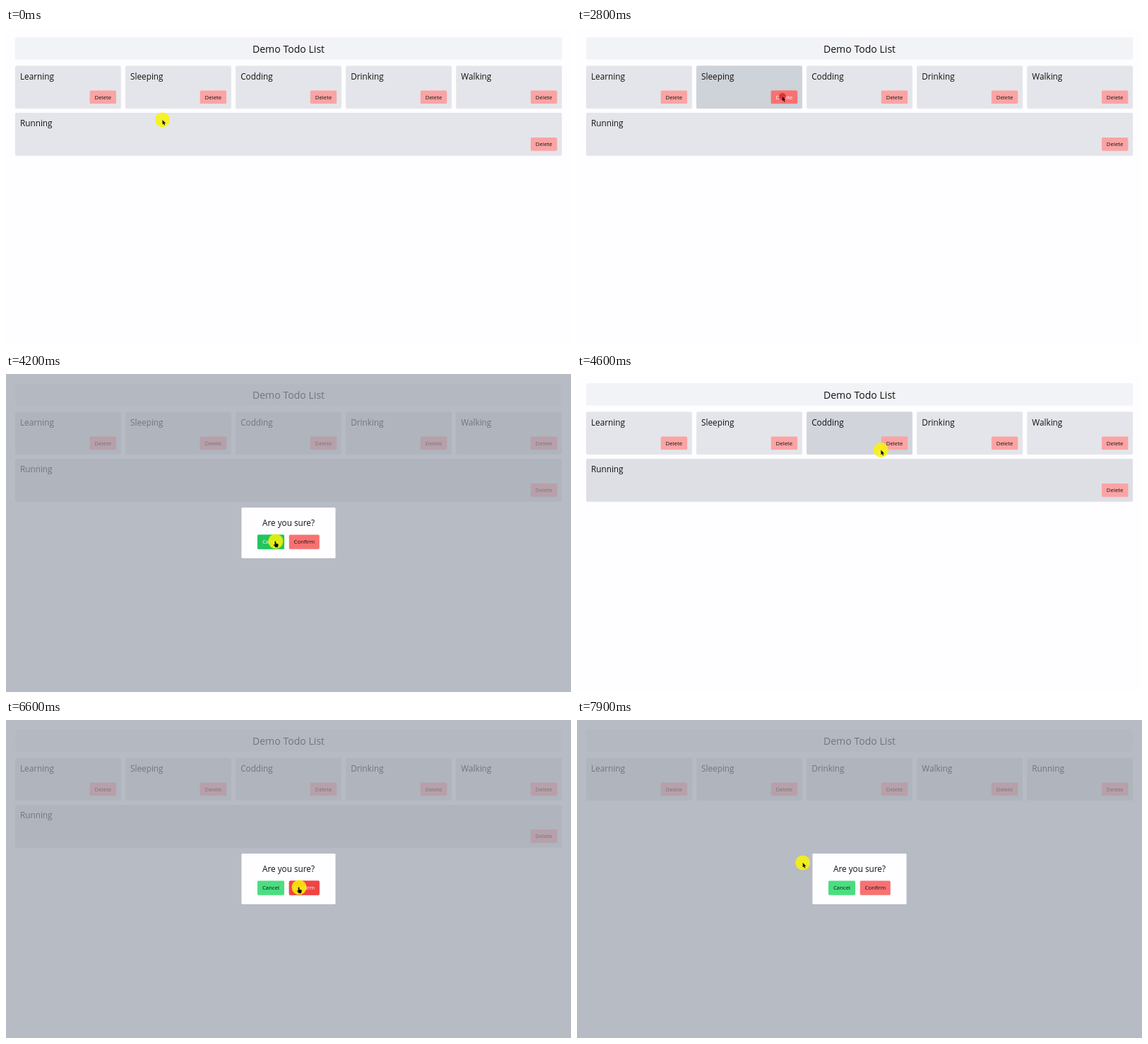
Recreate the animation shown at these times as an HTML page with a canvas. Size 800 px wide and 450 px high, loop 8 s.

```html
<!DOCTYPE html>
<html lang="en">
<head>
<meta charset="utf-8">
<title>Demo Todo List</title>
<style>
html, body { margin: 0; width: 100%; height: 100%; overflow: hidden; background: #fefdff; }
canvas { display: block; width: 800px; height: 450px; }
</style>
</head>
<body>
<canvas id="stage"></canvas>
<script>
const LOOP = 8000, FADE = 150, PRESS = 150;
const FONT = '"Open Sans", "Noto Sans", sans-serif';
const PAPER = '#fefdff', INK = '#111';
const RED = '#f87171', PINK = '#fca3a4';
const canvas = document.getElementById('stage');
const ctx = canvas.getContext('2d');
const ratio = window.devicePixelRatio || 1;
canvas.width = 800 * ratio;
canvas.height = 450 * ratio;

// Layout: five cards per row, a lone card fills its row
const MARGIN = 13, WIDTH = 774, GAP = 6.4, COLS = 5;
const box = (x, y, w, h) => ({ x, y, w, h });
const names = ['Learning', 'Sleeping', 'Codding', 'Drinking', 'Walking', 'Running'];

function layout(list) {
  return list.map((name, i) => {
    const row = Math.floor(i / COLS);
    const n = Math.min(COLS, list.length - row * COLS);
    const w = (WIDTH - GAP * (n - 1)) / n;
    return { name, ...box(MARGIN + (i % COLS) * (w + GAP), 53.4 + row * 66.7, w, 60.3) };
  });
}
const deleteBox = c => box(c.x + c.w - 44, c.y + 35, 37.3, 18.6);

const before = layout(names);
const after = layout(names.filter(name => name !== 'Codding'));
const dialog = box(333.4, 189.1, 133.2, 71.7);
const cancel = box(356, 227.4, 38, 20.3);
const confirmBox = box(400.8, 227.4, 43, 20.3);
const sleepDelete = deleteBox(before[1]), codeDelete = deleteBox(before[2]);

// Pointer stops; a press ends its stay and opens or closes the dialog
const wander = (at, x, y) => ({ at, end: at, x, y });
const press = (at, end, b, u) => ({ at, end, x: b.x + b.w * u, y: b.y + b.h * 0.46, click: true });
const stops = [
  wander(0, 221.5, 130),
  wander(450, 232, 247),
  wander(1250, 222, 92),
  wander(1570, 305, 79),
  wander(1600, 361, 78),
  wander(2050, 440, 140),
  press(2700, 2900, sleepDelete, 0.43),
  press(3950, 4360, cancel, 0.68),
  wander(4500, 430, 108),
  press(5400, 5800, codeDelete, 0.27),
  press(6400, 6850, confirmBox, 0.33),
  press(7400, 7600, sleepDelete, 0.49),
  wander(LOOP, 324.5, 221)
];
const presses = stops.filter(s => s.click);
const removedAt = presses[3].end;

const isOpen = t => presses.filter(s => t >= s.end).length % 2 === 1;
const isPressed = t => presses.some(s => t >= s.end - PRESS && t < s.end);
const inside = (p, b) => p.x >= b.x && p.x < b.x + b.w && p.y >= b.y && p.y < b.y + b.h;

function pointer(t) {
  const next = stops.findIndex(s => s.at > t);
  const a = stops[next - 1], b = stops[next];
  const u = Math.max(0, (t - a.end) / (b.at - a.end));
  const k = u * u * (3 - 2 * u);
  return { x: a.x + (b.x - a.x) * k, y: a.y + (b.y - a.y) * k };
}

// Share of the last FADE ms that the pointer spent over a box
function hover(b, t, inDialog) {
  const steps = 15;
  let n = 0;
  for (let i = 1; i <= steps; i++) {
    const s = t - FADE * i / steps;
    if (s >= 0 && isOpen(s) === inDialog && inside(pointer(s), b)) n++;
  }
  return n / steps;
}

function panel(b, color, alpha = 1) {
  ctx.save();
  ctx.globalAlpha = alpha;
  ctx.shadowColor = 'rgba(0,0,0,.05)';
  ctx.shadowBlur = 1.5 * ratio;
  ctx.shadowOffsetY = 0.5 * ratio;
  ctx.fillStyle = color;
  ctx.beginPath();
  ctx.roundRect(b.x, b.y, b.w, b.h, 1.6);
  ctx.fill();
  ctx.restore();
}

function label(text, x, y, size, align = 'left', color = INK) {
  ctx.font = `${size}px ${FONT}`;
  ctx.textAlign = align;
  ctx.fillStyle = color;
  ctx.fillText(text, x, y);
}

function button(text, b, color, hot, t, inDialog) {
  const k = hover(b, t, inDialog);
  panel(b, color);
  panel(b, hot, k);
  label(text, b.x + b.w / 2, b.y + b.h / 2 + 2.9, 7.83, 'center', k > 0.5 ? '#fff' : INK);
}

function card(c, t) {
  panel(c, '#e4e5ea');
  panel(c, '#ced2d9', hover(c, t, false));
  label(c.name, c.x + 7, c.y + 19.2, 11.75);
  button('Delete', deleteBox(c), PINK, RED, t, false);
}

function drawDialog(t) {
  ctx.fillStyle = 'rgba(154,160,172,.7)';
  ctx.fillRect(0, 0, 800, 450);
  panel(dialog, PAPER);
  label('Are you sure?', 400, 214.8, 11.75, 'center');
  button('Cancel', cancel, '#4ade80', '#22c55e', t, true);
  button('Confirm', confirmBox, RED, '#ef4444', t, true);
}

function disc(p, r, color) {
  ctx.fillStyle = color;
  ctx.beginPath();
  ctx.arc(p.x, p.y, r, 0, Math.PI * 2);
  ctx.fill();
}

const arrow = new Path2D('M0 0V6.6L1.5 5.3L2.6 7.8L3.7 7.3L2.7 4.9H4.8Z');
const hand = new Path2D('M-1 0Q0 -.6 .5 .6V3L3.3 3.8Q4 4 3.8 5L3 8.4H-.3L-2.9 5.2Q-2.6 4 -1.3 5V.6Z');
const beam = new Path2D('M-1.7 -3H-.5L0 -2.6L.5 -3H1.7M0 -2.6V2.6M-1.7 3H-.5L0 2.6L.5 3H1.7');

function overName(p, c) {
  ctx.font = `11.75px ${FONT}`;
  return inside(p, box(c.x + 7, c.y + 7, ctx.measureText(c.name).width, 18));
}

function cursor(t, list) {
  const p = pointer(t), open = isOpen(t);
  if (isPressed(t)) disc(p, 5, 'rgba(220,38,46,.85)');
  else disc(p, 10.5, 'rgba(249,243,8,.85)');
  ctx.save();
  ctx.translate(p.x, p.y);
  if (!open && list.some(c => overName(p, c))) {
    ctx.strokeStyle = '#222';
    ctx.lineWidth = 0.9;
    ctx.stroke(beam);
  } else {
    ctx.fillStyle = INK;
    ctx.fill(open && (inside(p, cancel) || inside(p, confirmBox)) ? hand : arrow);
  }
  ctx.restore();
}

function draw(t) {
  const list = t < removedAt ? before : after;
  ctx.setTransform(ratio, 0, 0, ratio, 0, 0);
  ctx.fillStyle = PAPER;
  ctx.fillRect(0, 0, 800, 450);
  panel(box(MARGIN, 13.3, WIDTH, 30.8), '#f2f3f6');
  label('Demo Todo List', 400, 34.5, 14.1, 'center');
  list.forEach(c => card(c, t));
  if (isOpen(t)) drawDialog(t);
  cursor(t, list);
}

const start = performance.now();
function tick() {
  draw((performance.now() - start) % LOOP);
  requestAnimationFrame(tick);
}
tick();
</script>
</body>
</html>
```
